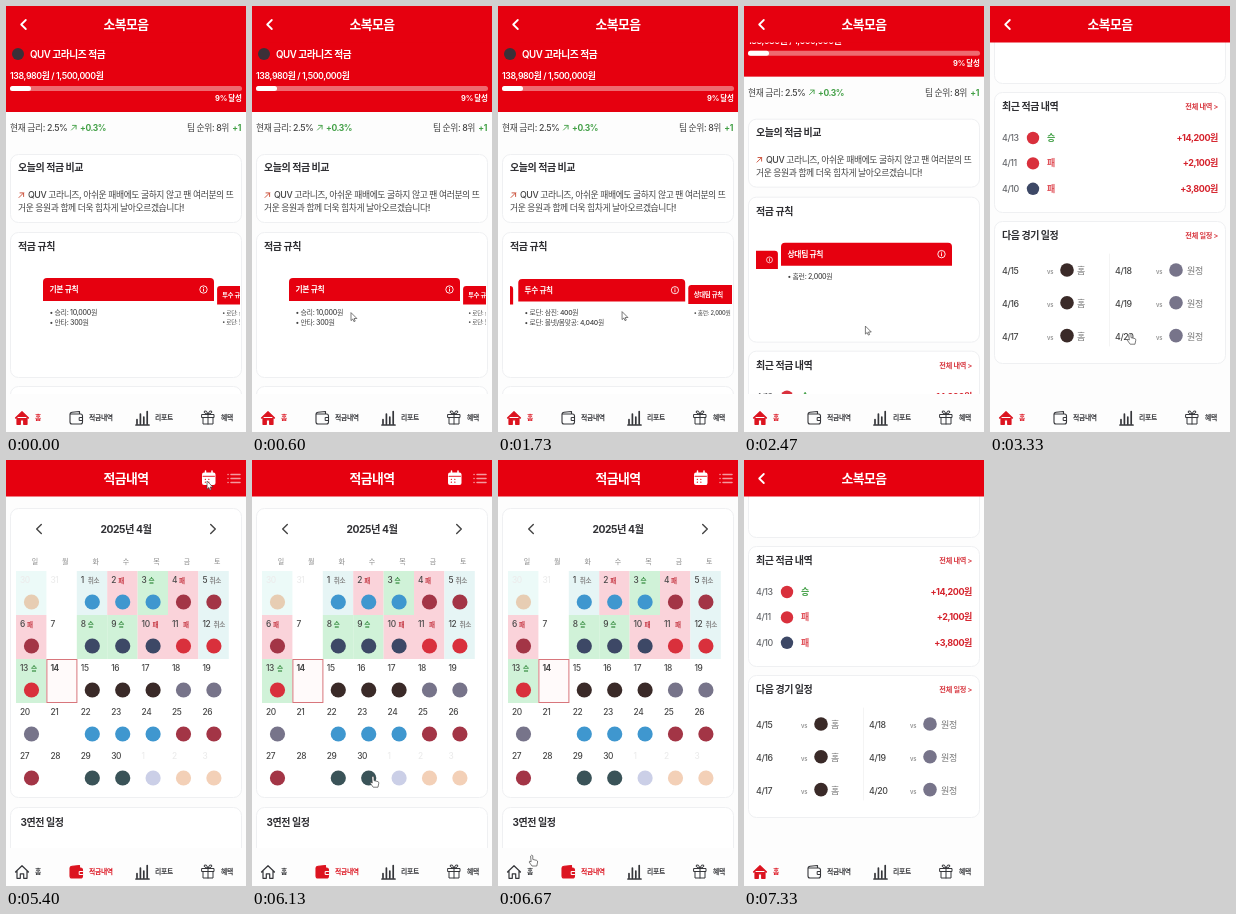
Write an HTML page that moves like this. It is 240 px wide and 426 px high and loops after 7390 ms.

```html
<!DOCTYPE html>
<html lang="ko">
<head>
<meta charset="utf-8">
<style>
html, body { margin: 0; width: 100%; height: 100%; overflow: hidden; background: #fdfdfd; }
svg { display: block; width: 100%; height: 100%; }
text { font-family: Inter, "Noto Sans CJK KR", "Noto Sans CJK", sans-serif; letter-spacing: -.045em; white-space: pre; }
</style>
</head>
<body>
<svg id="stage" viewBox="0 0 240 426"></svg>
<script>
const LOOP = 7390, STEP = 200 / 3, MAX_SCROLL = 294;
const RED = '#e6000f', GREEN = '#43a047', LOSS = '#e0525a', INK = '#303034', GRAY = '#66686c', BLUE = '#1d86dc';
const APP = '소복모음', CLUB = 'QUV', PITCHER = '로단';

const text = (x, y, str, size, fill = INK, weight = 500, anchor = 'start') =>
  `<text x="${x}" y="${y}" font-size="${size}" fill="${fill}" font-weight="${weight}" text-anchor="${anchor}">${str}</text>`;
const rect = (x, y, w, h, fill, extra = '') =>
  `<rect x="${x}" y="${y}" width="${w}" height="${h}" fill="${fill}" ${extra}/>`;
const line = (d, stroke, width = 1, fill = 'none', extra = '') =>
  `<path d="${d}" stroke="${stroke}" stroke-width="${width}" fill="${fill}" stroke-linecap="round" stroke-linejoin="round" ${extra}/>`;
const dot = (x, y, r, fill, opacity = 1) => `<circle cx="${x}" cy="${y}" r="${r}" fill="${fill}" opacity="${opacity}"/>`;
const card = (x, y, w, h) => rect(x + .5, y + .5, w - 1, h - 1, '#fff', 'rx="8" stroke="#eff0f2"');
const group = (id, body, extra = '') => `<g id="${id}" ${extra}>${body}</g>`;
const rise = (x, y, color) => line(`M${x} ${y}l4.6 -4.6m-3.6 0h3.6v3.6`, color, .9);
const chevron = (x, y, dir, color, width) => line(`M${x - 2.3 * dir} ${y - 4.5}l${4.6 * dir} 4.5l${-4.6 * dir} 4.5`, color, width);
const header = title => rect(0, 0, 240, 36.5, RED) + text(120, 23, title, 12.8, '#fff', 700, 'middle');

// Home
const rules = [
  ['기본 규칙', '승리: 10,000원', '안타: 300원'],
  ['투수 규칙', `${PITCHER}: 삼진: 400원`, `${PITCHER}: 볼넷/몸맞공: 4,040원`],
  ['상대팀 규칙', '홈런: 2,000원']
];
// Each slide is drawn around its own centre
const slide = ([title, ...items], i) => group('slide' + i,
  line('M-85.5 -17v-19q0 -4 4 -4h163q4 0 4 4v19z', 'none', 0, RED) +
  text(-79, -26, title, 7.8, '#fff', 700) +
  `<circle cx="75" cy="-28.5" r="3.7" fill="none" stroke="#fff" stroke-width=".9"/>` +
  line('M75 -29v2.2M75 -30.5v.1', '#fff', .9) +
  items.map((s, n) => text(-79, -3.5 + n * 10.5, '• ' + s, 7, '#444')).join(''));

function hero() {
  return rect(0, 36, 240, 70, RED) + dot(12, 48, 6, '#3b3038') +
    text(24, 52, CLUB + ' 고라니즈 적금', 9.7, '#fff', 600) +
    text(4, 73, '138,980원 / 1,500,000원', 8.8, '#fff', 600) +
    rect(4, 80, 232, 5, '#ee6a70', 'rx="2.5"') + rect(4, 80, 21, 5, '#fff', 'rx="2.5"') +
    text(235.5, 95, '9% 달성', 7.5, '#fff', 700, 'end') +
    text(4, 125, '현재 금리: 2.5%', 8.8, '#444') + rise(65.5, 124, GREEN) +
    text(74, 125, '+0.3%', 8.5, GREEN, 700) +
    text(223, 125, '팀 순위: 8위', 8.8, '#444', 500, 'end') + text(235, 125, '+1', 8.5, GREEN, 700, 'end');
}

function recent(y) {
  const rows = [['4/13', '#d9303c', '승', '+14,200원'], ['4/11', '#d9303c', '패', '+2,100원'], ['4/10', '#3d4866', '패', '+3,800원']];
  return card(4, y, 232, 121) + text(12, y + 18, '최근 적금 내역', 10, INK, 700) +
    text(228, y + 17, '전체 내역 &gt;', 7.2, '#d83a42', 600, 'end') +
    rows.map(([day, logo, result, sum], i) => {
      const b = y + 49 + i * 25.4;
      return text(12, b, day, 8.8, GRAY) + dot(43, b - 3, 6.2, logo) +
        text(57, b, result, 9, result === '승' ? GREEN : LOSS, 600) + text(228, b, sum, 9, '#d5222c', 700, 'end');
    }).join('');
}

function upcoming(y) {
  const game = (x, b, day, logo, place) => text(x, b, '4/' + day, 8.8, '#444') +
    text(x + (x < 100 ? 45 : 41), b, 'vs', 6, '#888') + dot(x + (x < 100 ? 65 : 61), b - 4, 6.8, logo) +
    text(x + (x < 100 ? 75 : 72), b, place, 9, '#777');
  return card(4, y, 232, 143) + text(12, y + 18, '다음 경기 일정', 10, INK, 700) +
    text(228, y + 17, '전체 일정 &gt;', 7.2, '#d83a42', 600, 'end') +
    line(`M119.5 ${y + 33}v92`, '#f4f4f4') +
    [0, 1, 2].map(i => game(12, y + 53 + i * 32.8, 15 + i, '#3a2a28', '홈') +
      game(125, y + 53 + i * 32.8, 18 + i, '#77748a', '원정')).join('');
}

const home = group('homeBody',
  hero() + card(4, 148, 232, 69) + text(12, 165, '오늘의 적금 비교', 10, INK, 700) + rise(13, 191.5, '#c8472f') +
  text(22, 192, CLUB + ' 고라니즈, 아쉬운 패배에도 굴하지 않고 팬 여러분의 뜨', 8.8, '#444') +
  text(12, 205, '거운 응원과 함께 더욱 힘차게 날아오르겠습니다!', 8.8, '#444') +
  card(4, 226, 232, 146) + text(12, 244, '적금 규칙', 10, INK, 700) +
  `<g clip-path="url(#track)">${rules.map(slide).join('')}</g>` + recent(380) + upcoming(509)) +
  header(APP) + chevron(17.5, 18.5, -1, '#fff', 1.8);

// Savings history
const monthBar = (y, left, right) => chevron(left, y - 4, -1, '#444', 1.4) +
  chevron(right, y - 4, 1, '#444', 1.4) + text(120, y, '2025년 4월', 10.3, INK, 700, 'middle');

function entry([logo, sum, note, date], i) {
  const y = 94 + i * 97;
  return rect(14.5, y + .5, 211, 91, '#fff', 'rx="8" stroke="#e6edf3"') +
    line(`M15 ${y + 67}h210v17q0 7 -7 7h-196q-7 0 -7 -7z`, 'none', 0, '#f7f8f9') +
    text(25, y + 25, 'vs', 9.3, INK, 700) + dot(49, y + 22, 6.3, logo) +
    text(215, y + 25, sum, 10.2, BLUE, 700, 'end') + text(25, y + 51, note, 8.7, '#444') +
    text(25, y + 80, '적립일: ' + date, 8.2, GRAY);
}
const list = group('list', monthBar(69, 22, 218) + [
  ['#d9303c', '+14,200원', APP + ' 출금', '2025.4.14'],
  ['#d9303c', '+2,100원', APP + ' 출금', '2025.4.12'],
  ['#3d4866', '+3,800원', `"${CLUB}, ${PITCHER}의 호투와 팀 연승으로 분위기 UP! ${PITCHER}의...`, '2025.4.11']
].map(entry).join('') + rect(14.5, 385.5, 211, 60, '#fff', 'rx="8" stroke="#e6edf3"'));

const logos = { b: '#3f97cf', t: '#a33546', n: '#3d4866', r: '#d9303c', e: '#3a2a28', p: '#77748a', g: '#3a5358', v: '#7c86c4', o: '#e08a4a' };
const teams = 'o.bbbtt' + 't.nnnrr' + 'r.eeepp' + 'p.bbbtt' + 't.ggvoo';
const results = 'f.CLWLC' + 'L.WWLLC' + 'W';
const outcome = { C: ['취소', '#e6f5f5', '#888'], L: ['패', '#fad3da', '#c8404c'], W: ['승', '#d0f2d8', '#3d9147'], f: ['', '#ecfaf8', ''] };

function day(i) {
  const x = 10 + (i % 7) * 30.4, y = 111 + Math.floor(i / 7) * 44, n = i - 1;
  const outside = n < 1 || n > 30, today = n === 14, [label, fill, color] = outcome[results[i]] || [];
  const num = n < 1 ? 31 + n : n > 30 ? n - 30 : n;
  return (fill ? rect(x, y, 30.4, 44, fill) : '') +
    (today ? rect(x + .5, y + .5, 30, 43, '#fffafa', 'stroke="#d8767c"') : '') +
    text(x + 4, y + 12, num, 8.4, outside ? '#ececec' : '#484848', today ? 700 : 500) +
    (label ? text(x + (n > 9 ? 15 : 11), y + 11.5, label, 6.6, color, 600) : '') +
    (teams[i] !== '.' ? dot(x + 15.5, y + 31, 7.6, logos[teams[i]], outside ? .4 : 1) : '');
}
const calendar = group('calendar', card(4, 48, 232, 290) + monthBar(73, 33, 207) +
  [...'일월화수목금토'].map((d, i) => text(28.7 + i * 30.4, 103.5, d, 7, '#888', 500, 'middle')).join('') +
  Array.from({ length: 35 }, (_, i) => day(i)).join('') +
  card(4, 347, 232, 80) + text(14.5, 366, '3연전 일정', 10, INK, 700));

const calendarIcon = group('calendarIcon',
  rect(196, 12.5, 13.5, 12.5, '#fff', 'rx="2"') + line('M199.5 11v3M206 11v3', '#fff', 1.5) +
  line('M197 16.3h11.5', RED, .9) + line('M199.3 19.3h7M199.3 22.2h7', RED, 1.2, 'none', 'stroke-dasharray=".1 3.4"'));
const listIcon = group('listIcon', line('M222 14.5h.1M222 18.5h.1M222 22.5h.1M225 14.5h9M225 18.5h9M225 22.5h9', '#fff', 1.5));
const history = list + calendar + header('적금내역') + calendarIcon + listIcon;

// Tab bar
function nav(active) {
  const tone = i => i === active ? '#dc1420' : '#35363a', on = i => i === active ? tone(i) : 'none';
  const labels = [[29, '홈'], [83, '적금내역'], [149, '리포트'], [215, '혜택']];
  return rect(0, 388, 240, 38, '#fdfdfd') +
    line('M9.5 412l6.5 -6.3l6.5 6.3M11 411v7.3h3.3v-4.5h3.4v4.5h3.3v-7.3', tone(0), 1.2, on(0)) +
    line('M64 408v8q0 2 2 2h8.5q2 0 2 -2v-6q0 -2 -2 -2zq0 -1.5 2 -1.8l7.5 -.7v2.5', tone(1), 1.1, on(1)) +
    line('M76.5 411.5h-3.3v3h3.3', active === 1 ? '#fff' : tone(1), 1) +
    line('M131 413.5v4M134.4 408v9.5M137.8 411v6.5M141.2 405.5v12M130 419h13', tone(2), 1.7) +
    line('M196 408.5h12v3h-12zM197 411.5v6.5h10v-6.5M202 408.5v9.5M202 408q-5 -.5 -3.5 -3q2 -1.2 3.5 3q1.5 -4.2 3.5 -3q1.5 2.5 -3.5 3', tone(3), 1) +
    labels.map(([x, s], i) => text(x, 414, s, 6.8, tone(i), 700)).join('');
}

const arrow = group('arrow', line('M0 0v7.6l1.8 -1.6l1.1 2.6l1.3 -.5l-1.1 -2.6h2.4z', '#444', .7, '#fff'));
const hand = group('hand', line('M-1 1q1 -1.6 2 0v3.6l4 1q1 .4 .8 1.6l-.8 4h-4.8l-2.9 -4q0 -1.4 1.7 -.4z', '#444', .7, '#fff'));

document.getElementById('stage').innerHTML =
  '<defs><clipPath id="track"><rect x="12" y="262" width="222" height="100"/></clipPath></defs>' +
  rect(0, 0, 240, 426, '#fdfdfd') + group('home', home + nav(0)) + group('history', history + nav(1)) +
  group('cursor', arrow + hand);

const el = id => document.getElementById(id);
const show = (id, on) => el(id).setAttribute('display', on ? 'inline' : 'none');
const ease = k => k * k * (3 - 2 * k);

function track(keys, t) {
  const i = keys.findIndex(k => k[0] > t);
  if (i === 0) return keys[0].slice(1);
  if (i < 0) return keys[keys.length - 1].slice(1);
  const a = keys[i - 1], b = keys[i], k = ease((t - a[0]) / (b[0] - a[0]));
  return a.slice(1).map((v, n) => v + (b[n + 1] - v) * k);
}

const TO_HISTORY = 3930, TO_CALENDAR = 5270, TO_HOME = 7000;
const swipe = [[930, 0], [1130, .55], [1400, 1], [1667, 1], [1800, 1.24], [1900, 1.55], [2130, 2]];
const scroll = [[2300, 0], [3070, MAX_SCROLL]];
const pointer = [[70, -14, 330], [600, 99, 307], [930, 176, 307], [1130, 90, 307], [1400, 120, 307], [1600, 143, 306],
  [1667, 143, 306], [1800, 105, 306], [1950, 62, 307], [2300, 120, 320], [3330, 140, 327], [3800, 76, 410], [3980, 76, 410],
  [4600, 59, 76], [5180, 202, 18], [5350, 202, 18], [6130, 121, 316], [6850, 17, 410], [7040, 17, 410], [7240, 10, 440]];

function draw(t) {
  const onHistory = t >= TO_HISTORY && t < TO_HOME, onCalendar = t >= TO_CALENDAR;
  show('home', !onHistory);
  show('history', onHistory);
  show('list', !onCalendar);
  show('calendar', onCalendar);
  el('calendarIcon').setAttribute('opacity', onCalendar ? 1 : .6);
  el('listIcon').setAttribute('opacity', onCalendar ? .6 : 1);
  el('homeBody').setAttribute('transform', `translate(0 ${-track(scroll, t)[0]})`);

  const [position] = track(swipe, t);
  rules.forEach((_, i) => {
    const offset = i - position, scale = 1 - .2 * Math.min(1, Math.abs(offset));
    el('slide' + i).setAttribute('transform', `translate(${122.5 + offset * 157} 312) scale(${scale})`);
  });

  const [x, y] = track(pointer, t);
  const clickable = (t > 3070 && t < 4050) || (t > 5100 && t < 5400) || t > 5900;
  el('cursor').setAttribute('transform', `translate(${x} ${y})`);
  show('arrow', !clickable);
  show('hand', clickable);
}

const start = performance.now();
function tick() {
  const t = (performance.now() - start) % LOOP;
  draw(Math.floor((t + 4) / STEP) * STEP);
  requestAnimationFrame(tick);
}
tick();
</script>
</body>
</html>
```
